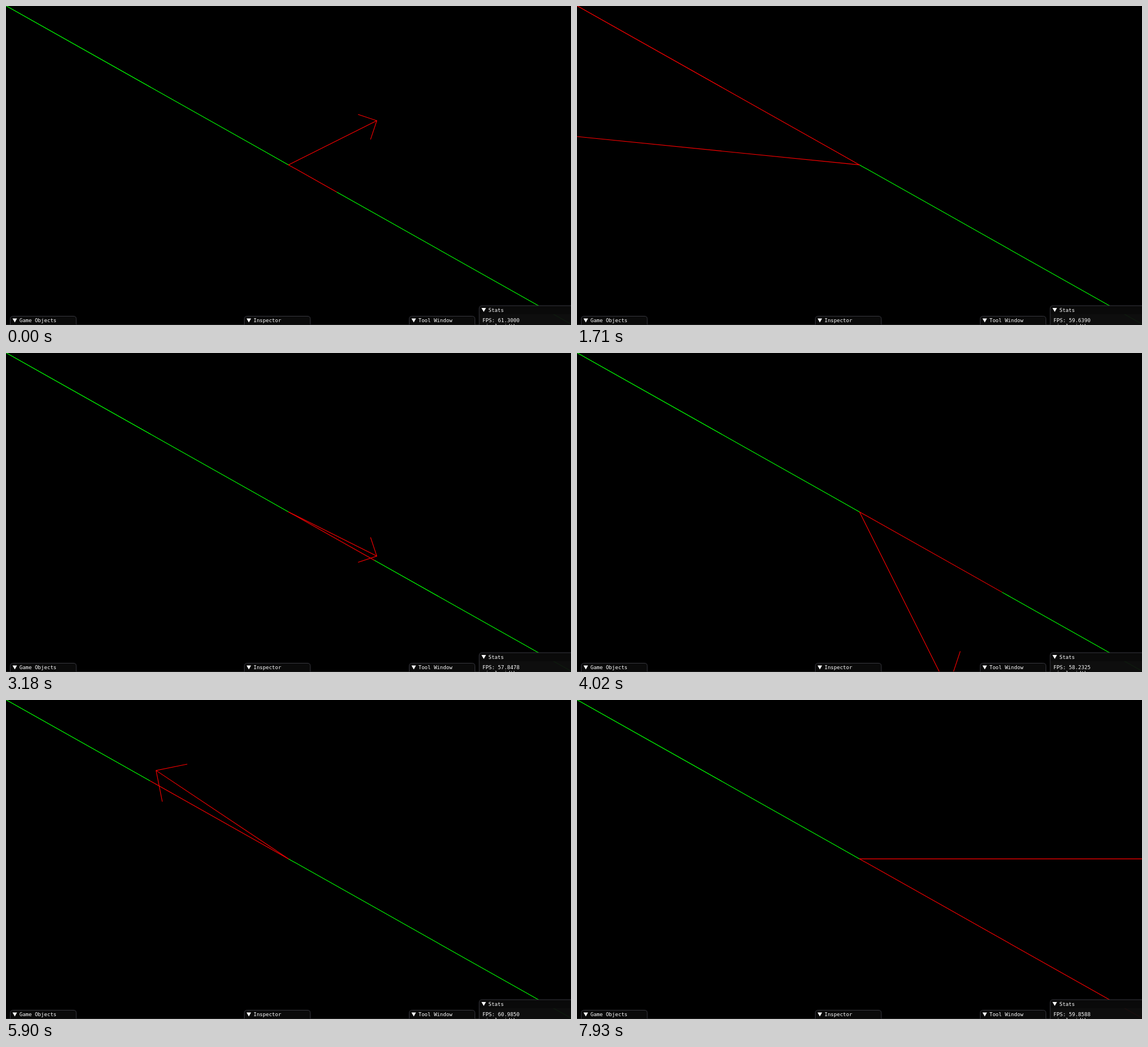
Write an HTML page that moves like this. It is 997 px wide and 562 px high and loops after 8000 ms.

```html
<!DOCTYPE html>
<html lang="en">
<head>
<meta charset="utf-8">
<title>Vector projection</title>
<style>
  html, body { margin: 0; width: 100%; height: 100%; overflow: hidden; background: #000; }
  svg { display: block; }
  text { font: 9.06px "DejaVu Sans Mono", monospace; fill: #fff; white-space: pre; }
  .axis, .vec { fill: none; stroke-width: 1.1; }
  .axis { stroke: #0f0; }
  .vec { stroke: #f00; }
  .edge { fill: none; stroke: #37373f; }
  .bar { fill: #0a0a0a; }
</style>
</head>
<body>
<svg width="997" height="562" viewBox="0 0 997 562">
  <rect width="997" height="562"/>
  <path class="axis" id="axis"/>
  <path class="vec" id="shadow"/>
  <path class="vec" id="arrow"/>
  <path stroke="#222" d="M0 561.5H997"/>
  <g id="panels"></g>
  <text id="fps" x="840.8" y="557.4"></text>
  <text x="840.8" y="567.4">pixel width</text>
</svg>
<script>
const $ = id => document.getElementById(id);
const LOOP = 8000, FIRST = 60, STEP = 77.4;
const CX = 498.5, CY = 279.9, UNIT = 77.9, REACH = 8;
const AXIS = [16 / Math.hypot(16, 9), 9 / Math.hypot(16, 9)];

// The vector is dragged one component at a time: [step, x, y].
const DRAGS = [[0, 2, -1], [11, 13, -1], [22, -10, -1], [27, -10, -1], [39, 2, -1],
  [47, 2, 7], [55, 2, 2], [64, -7, 2], [67, -7, 2], [71, -3, 2], [77, -3, -3],
  [80, -3, 0], [85, 2, 0], [88, 3, 0], [90, 5, 0], [93, 13, 0], [104, 13, 0]];

function vectorAt(step) {
  const i = DRAGS.findIndex(d => d[0] > step);
  const a = DRAGS[i - 1], b = DRAGS[i];
  const p = (step - a[0]) / (b[0] - a[0]);
  return [1, 2].map(c => Math.round(a[c] + (b[c] - a[c]) * p));
}

function fpsAt(step) {
  const seed = Math.sin(step * 12.9898) * 43758.5453;
  const noise = seed - Math.floor(seed) - 0.5;
  return (59.6 + 2.2 * Math.cos(step * Math.PI * 2 / 85) + noise).toFixed(4);
}

const pt = (x, y) => `${(CX + x * UNIT).toFixed(2)} ${(CY + y * UNIT).toFixed(2)}`;
const onAxis = d => pt(d * AXIS[0], d * AXIS[1]);

function draw(t) {
  const step = t < FIRST ? 0 : Math.floor((t - FIRST) / STEP) + 1;
  const [x, y] = vectorAt(step);
  const k = 0.2 * Math.SQRT1_2;
  const wingA = pt(x + k * (y - x), y - k * (x + y));
  const wingB = pt(x - k * (x + y), y + k * (x - y));
  const dot = Math.max(-REACH, Math.min(REACH, x * AXIS[0] + y * AXIS[1]));
  const lo = Math.min(0, dot), hi = Math.max(0, dot);
  $('arrow').setAttribute('d', `M${pt(0, 0)}L${pt(x, y)}M${wingA}L${pt(x, y)}L${wingB}`);
  $('shadow').setAttribute('d', `M${onAxis(lo)}L${onAxis(hi)}`);
  $('axis').setAttribute('d', `M${onAxis(-REACH)}L${onAxis(lo)}M${onAxis(hi)}L${onAxis(REACH)}`);
  $('fps').textContent = 'FPS: ' + fpsAt(step);
}

function panel(x, y, w, title, open) {
  const top = `M${x} ${y + 15}V${y + 5}Q${x} ${y} ${x + 5} ${y}H${x + w - 5}Q${x + w} ${y} ${x + w} ${y + 5}V${y + 15}`;
  const body = open
    ? `<rect x="${x}" y="${y + 15}" width="${w}" height="40" fill="#0f0f0f" opacity=".94"/>
       <path class="edge" d="M${x} ${y + 15}v40"/>` : '';
  return `${body}<path class="bar" d="${top}Z"/><path class="edge" d="${top}"/>
    <path fill="#fff" d="M${x + 4} ${y + 4}h8l-4 7z"/>
    <text x="${x + 16.2}" y="${y + 10.9}">${title}</text>`;
}

$('panels').innerHTML = panel(7.5, 546.5, 116.5, 'Game Objects')
  + panel(420.5, 546.5, 116.5, 'Inspector')
  + panel(711.5, 546.5, 116, 'Tool Window')
  + panel(835, 528, 170, 'Stats', true);

const start = performance.now();
function frame() {
  draw((performance.now() - start) % LOOP);
  requestAnimationFrame(frame);
}
frame();
</script>
</body>
</html>
```
